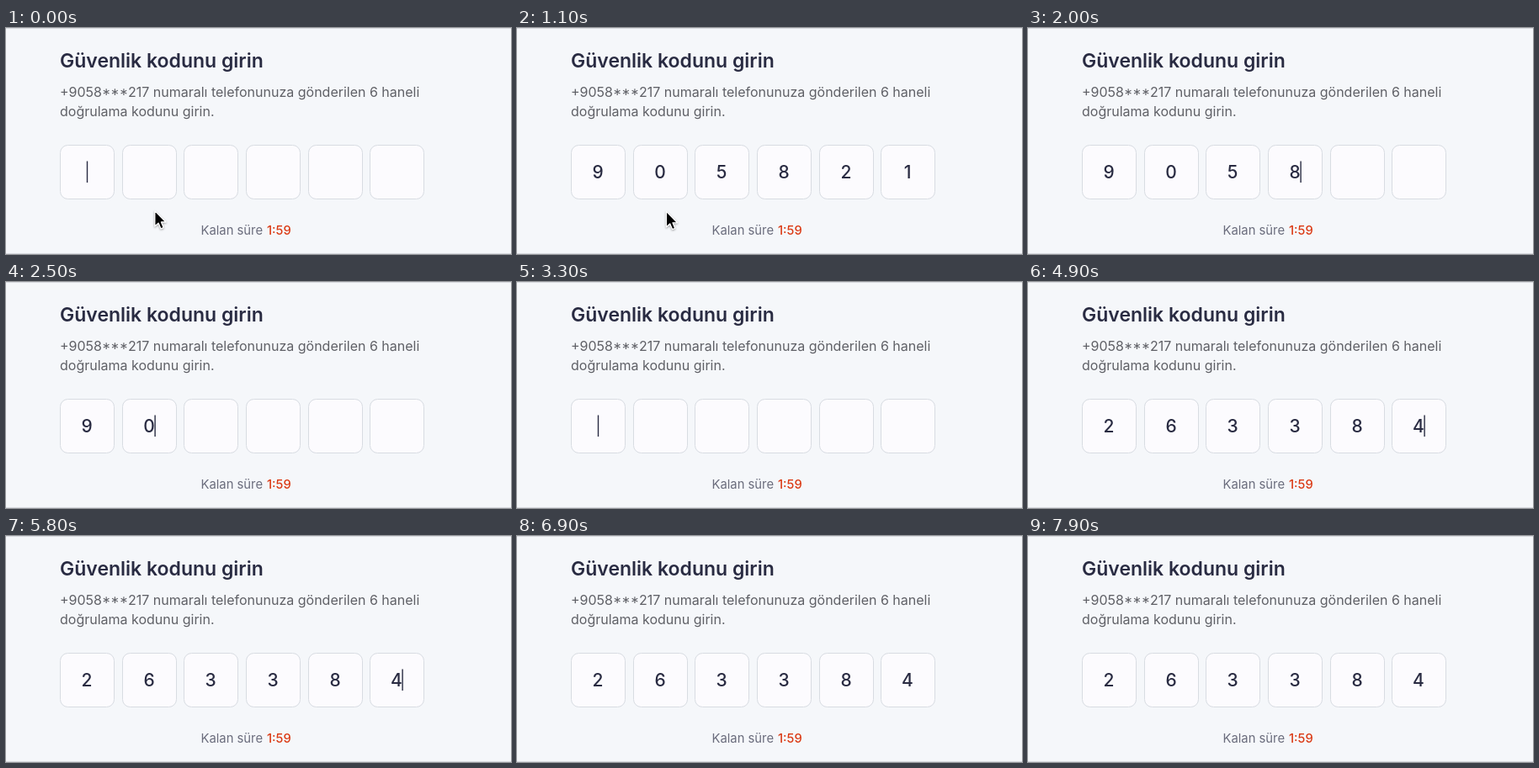
These frames come from a looping animation (600x269 px, 8000 ms). An HTML page:

```html
<!DOCTYPE html>
<html lang="tr">
<head>
<meta charset="utf-8">
<title>Güvenlik kodu</title>
<style>
  html, body { margin: 0; width: 100%; height: 100%; overflow: hidden; background: #f5f7fa; }
  svg { display: block; width: 600px; height: 269px; font-family: Inter, sans-serif; }
  .title { font-size: 23px; font-weight: 600; fill: #292b42; }
  .info { font-size: 16px; fill: #5f6066; }
  .label { font-size: 14.8px; fill: #6b6d7d; }
  .time { font-size: 14.7px; font-weight: 500; fill: #db3a14; }
  .digit { font-size: 21px; font-weight: 450; fill: #292b42; text-anchor: middle; }
  .box { fill: #fcfbfe; stroke: #d8dce2; }
</style>
</head>
<body>
<svg id="stage" viewBox="0 0 600 269">
  <path d="M0 .5H600M0 268.5H600" stroke="#d9dbe0"/>
  <text class="title" x="64" y="47">Güvenlik kodunu girin</text>
  <text class="info" x="64" y="82.3">+9058***217 numaralı telefonunuza gönderilen 6 haneli</text>
  <text class="info" x="64" y="105.3">doğrulama kodunu girin.</text>
  <text class="label" x="231.5" y="246">Kalan süre</text>
  <text class="time" x="310" y="246">1:59</text>
  <g id="boxes"></g>
  <rect id="caret" y="158.5" width="1.4" height="25.5" fill="#292b42"/>
  <path id="pointer" d="M0 0V18.5L4.3 14.6L7.2 21.3L10.4 20L7.6 13.4H13.2Z"
        fill="#000" stroke="#fff" stroke-width="1.3" stroke-linejoin="round"
        style="filter: drop-shadow(0 1px 1px rgba(0,0,0,.35))"/>
</svg>
<script>
const LOOP = 8000, PITCH = 73.65, CENTER = 96.5, HIDDEN = -1;

// start time, digits entered, box holding the caret
const steps = [
  [0, '', 0],
  [300, '905821', 5],
  [800, '905821', HIDDEN],
  [1300, '905821', 5],
  [1500, '90582', 4],
  [1800, '9058', 3],
  [2200, '905', 2],
  [2500, '90', 1],
  [2900, '9', 0],
  [3200, '', 0],
  [3700, '', HIDDEN],
  [3800, '2', 1],
  [4100, '26', 2],
  [4400, '263', 3],
  [4500, '2633', 4],
  [4600, '26338', 5],
  [4800, '263384', 5],
  [5300, '263384', HIDDEN],
  [5800, '263384', 5],
  [6300, '263384', HIDDEN],
  [7200, '263384', 5],
  [7800, '263384', HIDDEN]
];

const boxes = document.getElementById('boxes');
const caret = document.getElementById('caret');
const pointer = document.getElementById('pointer');

function add(tag, attrs) {
  const el = document.createElementNS('http://www.w3.org/2000/svg', tag);
  for (const key in attrs) el.setAttribute(key, attrs[key]);
  return boxes.appendChild(el);
}

const boxCenter = i => CENTER + Math.round(i * PITCH);

const digits = Array.from({ length: 6 }, (_, i) => {
  const x = boxCenter(i);
  add('rect', { class: 'box', x: x - 32, y: 139.5, width: 64, height: 64, rx: 9 });
  return add('text', { class: 'digit', x: x - .5, y: 179 });
});

function draw(t) {
  const [, code, active] = steps.findLast(step => step[0] <= t);
  digits.forEach((el, i) => { el.textContent = code[i] || ''; });

  const shift = code[active] ? 5.9 : -.7;
  caret.setAttribute('x', boxCenter(active) + shift);
  caret.style.display = active === HIDDEN ? 'none' : '';

  pointer.setAttribute('transform', t < 400 ? 'translate(176.8 217.6)' : 'translate(177.4 218.4)');
  pointer.style.display = t < 1400 ? '' : 'none';
}

const start = performance.now();
function tick() {
  draw((performance.now() - start) % LOOP);
  requestAnimationFrame(tick);
}
tick();
</script>
</body>
</html>
```
